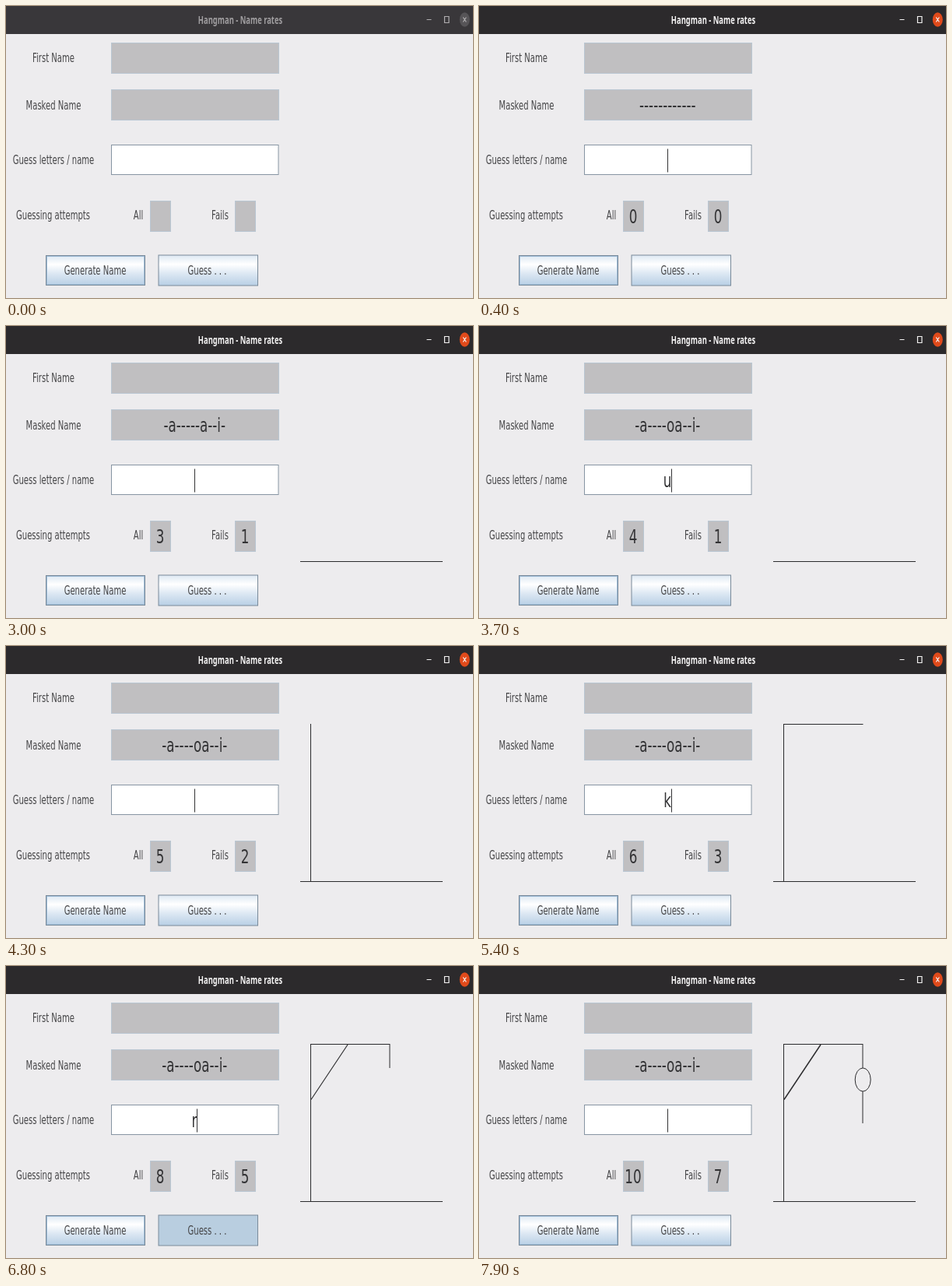
These frames come from a looping animation (600 by 375 pixels, 8000 ms). An HTML page:

```html
<!DOCTYPE html>
<html lang="en">
<head>
<meta charset="utf-8">
<title>Hangman</title>
<style>
  html, body { margin: 0; width: 100%; height: 100%; overflow: hidden; background: #edecee; }
  svg { display: block; width: 600px; height: 375px; }
  text { text-anchor: middle; white-space: pre; }
  .label { font: 15px "DejaVu Sans", sans-serif; fill: #454547; }
  .big { font: 25px "DejaVu Sans", sans-serif; fill: #333335; }
  .title { font: bold 14px "Noto Sans", sans-serif; fill: #f4f3f3; }
  .bar { fill: #2c2a2c; }
  .close { fill: #e04a1b; }
  .icons { fill: none; stroke: #f4f3f3; stroke-width: 1.2; }
  .idle .title { fill: #a09ea0; }
  .idle .bar { fill: #39373a; }
  .idle .close { fill: #565457; }
  .idle .icons { stroke: #b0aeb0; }
  .readonly { fill: #c0bfc1; stroke: #b9c6d2; }
  .entry { fill: #fff; stroke: #8795a3; }
  .button { fill: url(#metal); stroke: #7a8a99; }
  .button.down { fill: #b9cee0; }
  .hover { fill: none; stroke: #9dbbd6; }
  .caret { stroke: #333335; }
  .gallows { fill: none; stroke: #2b2b2d; }
</style>
</head>
<body>
<svg id="app" viewBox="0 0 600 375">
  <defs>
    <linearGradient id="metal" x2="0" y2="1">
      <stop offset="0" stop-color="#dde8f3"/>
      <stop offset=".3" stop-color="#fff"/>
      <stop offset=".6" stop-color="#dde8f3"/>
      <stop offset="1" stop-color="#b8cfe5"/>
    </linearGradient>
  </defs>
  <rect width="600" height="375" fill="#edecee"/>
  <rect class="bar" width="600" height="36"/>
  <ellipse class="close" cx="589.3" cy="17.5" rx="6.5" ry="9.3"/>
  <path class="icons" d="M540.5 17.5h6M563.5 13.5h5.5v8h-5.5zM587.3 14.5l4 6M591.3 14.5l-4 6"/>

  <rect class="readonly" x="135.5" y="47.5" width="215" height="39"/>
  <rect class="readonly" x="135.5" y="107.5" width="215" height="39"/>
  <rect class="entry" x="135.5" y="178.5" width="214.5" height="38"/>
  <rect class="readonly" x="185.5" y="250.5" width="26" height="39"/>
  <rect class="readonly" x="294.5" y="250.5" width="26" height="39"/>

  <rect class="button" id="generate" x="51.5" y="320.5" width="127" height="38"/>
  <rect class="hover" x="52.5" y="321.5" width="125" height="36"/>
  <rect class="button" id="guess" x="196" y="320" width="127.5" height="39"/>

  <g class="gallows" id="gallows">
    <path d="M378 302.5H561"/>
    <path d="M391.5 302V100"/>
    <path d="M391.5 100.5H493.5"/>
    <path id="brace" d="M392 171.5L439 101"/>
    <path d="M493 101V131"/>
    <ellipse cx="493.2" cy="146" rx="10" ry="15"/>
    <path d="M493 161V202"/>
  </g>
  <g id="texts" transform="scale(.67 1)"></g>
  <path class="caret" id="caret" d="M0 183.5V213.5"/>
</svg>
<script>
const LOOP = 8000, SQUEEZE = 0.67, MID = 242.5;
const $ = id => document.getElementById(id);

function addText(cls, x, y, str = '') {
  const el = document.createElementNS('http://www.w3.org/2000/svg', 'text');
  el.setAttribute('class', cls);
  el.setAttribute('x', x / SQUEEZE);
  el.setAttribute('y', y);
  el.textContent = str;
  return $('texts').appendChild(el);
}

addText('title', 301, 23, 'Hangman - Name rates');
addText('label', 61, 72, 'First Name');
addText('label', 61, 133, 'Masked Name');
addText('label', 61, 203, 'Guess letters / name');
addText('label', 60.5, 274, 'Guessing attempts');
addText('label', 170, 274, 'All');
addText('label', 275, 274, 'Fails');
addText('label', 114.5, 345, 'Generate Name');
addText('label', 258.5, 345, 'Guess . . .');

const out = {
  mask: addText('big', 242.3, 136),
  entry: addText('big', 242, 207),
  all: addText('big', 198, 279),
  fails: addText('big', 307, 279)
};

// Each cue changes part of the state left by the one before.
const type = entry => ({ entry, caret: true });
const press = { down: 'guess' };
const answer = change => ({ down: '', entry: '', caret: true, ...change });
const cues = [
  [0, { idle: true, down: '', mask: '', entry: '', all: '', fails: '', caret: false }],
  [200, { idle: false, down: 'generate' }],
  [300, { down: '', mask: '------------', all: 0, fails: 0 }],
  [400, { caret: true }],
  [800, type('a')],
  [1300, press],
  [1400, answer({ mask: '-a-----a----', all: 1 })],
  [1700, type('e')],
  [2300, { caret: false }],
  [2400, answer({ all: 2, fails: 1 })],
  [2700, type('i')],
  [2800, press],
  [2900, answer({ mask: '-a-----a--i-', all: 3 })],
  [3200, type('o')],
  [3400, press],
  [3500, answer({ mask: '-a----oa--i-', all: 4 })],
  [3700, type('u')],
  [4000, press],
  [4100, answer({ all: 5, fails: 2 })],
  [4400, type('s')],
  [5000, press],
  [5100, answer({ all: 6, fails: 3 })],
  [5400, type('k')],
  [5600, press],
  [5700, answer({ all: 7, fails: 4 })],
  [6100, type('d')],
  [6200, press],
  [6300, answer({ all: 8, fails: 5 })],
  [6600, type('r')],
  [6800, press],
  [6900, answer({ all: 9, fails: 6 })],
  [7400, { caret: false }],
  [7700, type('t')],
  [7900, answer({ all: 10, fails: 7 })]
];
let last = {};
const states = cues.map(([at, change]) => (last = { ...last, ...change, at }));

function draw(s) {
  $('app').classList.toggle('idle', s.idle);
  for (const key in out) out[key].textContent = s[key];
  for (const id of ['generate', 'guess']) $(id).classList.toggle('down', s.down === id);
  [...$('gallows').children].forEach((part, i) => {
    part.style.display = i < s.fails ? '' : 'none';
  });
  // Repeated repaints darken the slanted brace.
  $('brace').style.strokeWidth = 1 + 0.15 * Math.max(0, s.fails - 4);
  const half = s.entry ? out.entry.getComputedTextLength() * SQUEEZE / 2 : 0;
  $('caret').setAttribute('transform', `translate(${Math.floor(MID + half) + 0.5} 0)`);
  $('caret').style.display = s.caret ? '' : 'none';
}

let shown;
const start = performance.now();
function tick() {
  const t = (performance.now() - start) % LOOP;
  const state = states.filter(s => s.at <= t).pop();
  if (state !== shown) draw(shown = state);
  requestAnimationFrame(tick);
}
tick();
</script>
</body>
</html>
```
